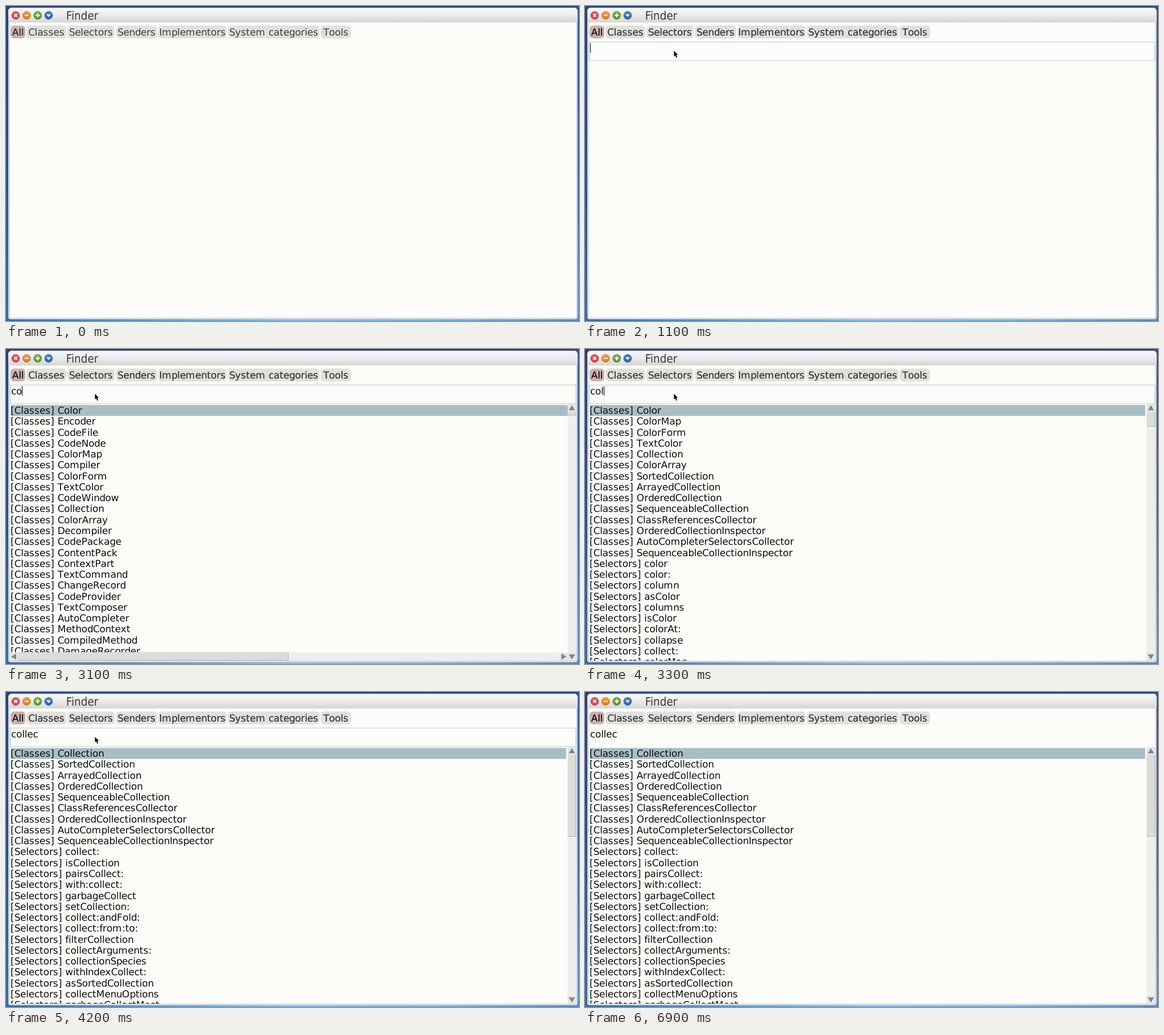
An HTML page with a canvas that plays this animation: 1008x555 px, repeating every 7200 ms.

```html
<!DOCTYPE html>
<html lang="en">
<head>
<meta charset="utf-8">
<title>Finder</title>
<style>
  html, body { margin: 0; width: 100%; height: 100%; overflow: hidden; }
  canvas { display: block; width: 1008px; height: 555px; }
</style>
</head>
<body>
<canvas id="stage" width="1008" height="555"></canvas>
<script>
const ctx = document.getElementById('stage').getContext('2d');
ctx.textRendering = 'geometricPrecision';
const LOOP = 7200;
// Text is laid out in whole pixels of a smaller screen, enlarged evenly.
const SCALE = 1.1335;
const FONT = '14.9px "DejaVu Sans", sans-serif';
const ROW = 17 * SCALE;

const TABS = [
  ['All', 8, 26], ['Classes', 36, 70], ['Selectors', 108, 83], ['Senders', 193.5, 72.5],
  ['Implementors', 268, 120], ['System categories', 390.5, 161], ['Tools', 553.5, 53.5]
];

const collClasses = 'Collection SortedCollection ArrayedCollection OrderedCollection ' +
  'SequenceableCollection ClassReferencesCollector OrderedCollectionInspector ' +
  'AutoCompleterSelectorsCollector SequenceableCollectionInspector';

const RESULTS = {
  co: {
    classes: 'Color Encoder CodeFile CodeNode ColorMap Compiler ColorForm TextColor CodeWindow ' +
      'Collection ColorArray Decompiler CodePackage ContentPack ContextPart TextCommand ' +
      'ChangeRecord CodeProvider TextComposer AutoCompleter MethodContext CompiledMethod DamageRecorder',
    selectors: '', thumb: 6, wide: true
  },
  col: {
    classes: 'Color ColorMap ColorForm TextColor Collection ColorArray ' + collClasses.slice(11),
    selectors: 'color color: column asColor columns isColor colorAt: collapse collect: colorMap',
    thumb: 26
  },
  coll: {
    classes: collClasses,
    selectors: 'collapse collect: collapseAll isCollapsed collapseIcon isCollection pairsCollect: ' +
      'with:collect: garbageCollect setCollection: aboutToCollapse: collect:andFold: ' +
      'collect:from:to: filterCollection haloCollapseIcon',
    thumb: 111
  },
  colle: {
    classes: collClasses,
    selectors: 'collect: isCollection pairsCollect: with:collect: garbageCollect setCollection: ' +
      'collect:andFold: collect:from:to: filterCollection collectArguments: collectionSpecies ' +
      'withIndexCollect: asSortedCollection collectMenuOptions garbageCollectMost',
    thumb: 144
  }
};
RESULTS.collec = RESULTS.colle;

// [time, value] steps; the last one reached applies.
const TYPED = [[0, ''], [3100, 'co'], [3300, 'col'], [3400, 'coll'], [3500, 'colle'], [3700, 'collec']];
const CARET = [[0, false], [1000, true], [2100, false], [2600, true], [4200, false], [4700, true],
  [5200, false], [5800, true], [6300, false]];
const POINTER = [[0, null], [800, [141, 25]], [900, [148, 52]], [1000, [154, 73]], [1100, [156, 79]],
  [6500, [155, 72]], [6600, [153, 54]], [6700, [150, 29]], [6800, [147, 2]], [6900, null]];
const TABS_REDRAWN = 800;

function stepAt(steps, t) {
  let value = steps[0][1];
  for (const [start, v] of steps) if (t >= start) value = v;
  return value;
}

function box(x, y, w, h, fill) {
  ctx.fillStyle = fill;
  ctx.fillRect(x, y, w, h);
}

function roundBox(x, y, w, h, r, fill) {
  ctx.fillStyle = fill;
  ctx.beginPath();
  ctx.roundRect(x, y, w, h, r);
  ctx.fill();
}

function poly(points, fill) {
  ctx.fillStyle = fill;
  ctx.beginPath();
  for (const [x, y] of points) ctx.lineTo(x, y);
  ctx.closePath();
  ctx.fill();
}

function gradient(x0, y0, x1, y1, colors) {
  const g = ctx.createLinearGradient(x0, y0, x1, y1);
  colors.forEach((c, i) => g.addColorStop(i / (colors.length - 1), c));
  return g;
}

function advance(ch) {
  ctx.font = FONT;
  return Math.round(ctx.measureText(ch).width);
}

function textWidth(text) {
  return SCALE * [...text].reduce((sum, ch) => sum + advance(ch), 0);
}

function drawText(text, x, y, color) {
  ctx.save();
  ctx.translate(x, y);
  ctx.scale(SCALE, SCALE);
  ctx.fillStyle = color;
  let pen = 0;
  for (const ch of text) {
    const step = advance(ch);
    ctx.fillText(ch, pen, 0);
    pen += step;
  }
  ctx.restore();
  return x + pen * SCALE;
}

function drawDesktop() {
  box(0, 0, 1008, 555, '#2b4a8c');
  box(0, 0, 8, 555, gradient(0, 0, 0, 555, ['#27417f', '#2a4f98', '#3a6cb2']));
  box(1000, 0, 8, 555, gradient(0, 0, 0, 555, ['#2f5295', '#3a64a8', '#5f97d2']));
  box(0, 545, 1008, 10, gradient(0, 0, 1008, 0, ['#3968ae', '#5f9ad6', '#86bbea', '#7ab0e2', '#5688c2']));
}

function drawButton(x, light, dark, sign) {
  const y = 16.5;
  ctx.fillStyle = gradient(0, y - 7, 0, y + 7, [light, dark]);
  ctx.beginPath();
  ctx.arc(x, y, 7, 0, 7);
  ctx.fill();
  ctx.strokeStyle = dark;
  ctx.lineWidth = 0.8;
  ctx.stroke();
  ctx.strokeStyle = '#fff';
  ctx.lineWidth = 1.8;
  ctx.beginPath();
  if (sign === 'x') {
    ctx.moveTo(x - 2.5, y - 2.5); ctx.lineTo(x + 2.5, y + 2.5);
    ctx.moveTo(x + 2.5, y - 2.5); ctx.lineTo(x - 2.5, y + 2.5);
  }
  if (sign === '-' || sign === '+') { ctx.moveTo(x - 3.7, y); ctx.lineTo(x + 3.7, y); }
  if (sign === '+') { ctx.moveTo(x, y - 3.7); ctx.lineTo(x, y + 3.7); }
  ctx.stroke();
  if (sign === 'v') poly([[x - 4, y - 1.8], [x + 4, y - 1.8], [x, y + 2.8]], '#fff');
}

function drawWindow() {
  roundBox(4, 3, 1001.5, 549, [6, 6, 4, 4], '#d3dde4');
  roundBox(4, 3, 1001.5, 26.5, [6, 6, 0, 0], gradient(0, 3, 0, 29, ['#fafafa', '#eaeaea', '#d6d6d6']));
  box(7, 29, 996, 520, '#fcfcf8');
  drawButton(17, '#e0606c', '#cf3f4c', 'x');
  drawButton(36.3, '#e8a04c', '#d87c20', '-');
  drawButton(55.8, '#82b050', '#5a8e2c', '+');
  drawButton(75, '#5586c6', '#2f60a8', 'v');
  ctx.font = 'condensed 20.5px "DejaVu Sans Condensed", "DejaVu Sans", sans-serif';
  ctx.fillStyle = '#3a3a3a';
  ctx.fillText('Finder', 105.8, 24.3);
}

// Repainting the labels over themselves thickens their soft edges.
function drawTabs(passes) {
  TABS.forEach(([label, x, w], i) => {
    roundBox(x, 34.5, w, 22.5, 6, i ? '#e0e0dd' : '#c9b1ae');
    const left = x + (w - textWidth(label)) / 2;
    for (let n = 0; n < passes; n++) drawText(label, left, 51.7, i ? '#3c3c3c' : '#1c1414');
  });
}

function drawArrow(x, y, turn) {
  box(x - 7.5, y - 7, 15, 14, '#e6e6e4');
  ctx.save();
  ctx.translate(x, y);
  ctx.rotate(turn * Math.PI / 2);
  poly([[-5.5, 4], [0, -5], [5.5, 4]], '#868686');
  ctx.restore();
}

function drawThumb(x, y, w, h) {
  box(x, y, w, h, '#b4b4b2');
  box(x, y, w - 1, h - 1, '#dcdcda');
}

function drawList({ classes, selectors, thumb, wide }) {
  const bottom = wide ? 534.5 : 549;
  box(9, 98.6, wide ? 979 : 976.5, ROW, '#a9bdc4');
  ctx.save();
  ctx.beginPath();
  ctx.rect(7, 97, 981, bottom - 97);
  ctx.clip();
  const label = (names, kind) => names.split(' ').filter(Boolean).map(n => `[${kind}] ${n}`);
  const rows = [...label(classes, 'Classes'), ...label(selectors, 'Selectors')];
  rows.forEach((row, i) => drawText(row, 8, 114 + i * ROW, '#0c0c0c'));
  ctx.restore();

  box(988, 96.5, 15, 452.5, '#eeeeec');
  drawArrow(995.5, 104, 0);
  drawArrow(995.5, 542, 2);
  drawThumb(988, 111, 15, thumb);
  if (wide) {
    box(7, 534.5, 981, 14.5, '#eeeeec');
    drawArrow(14, 542, 3);
    drawArrow(981, 542, 1);
    drawThumb(21, 534.5, 476, 14.5);
  }
}

function drawPointer([x, y]) {
  ctx.save();
  ctx.translate(x, y);
  const shape = [[0.5, 0], [0.5, 10], [2.7, 8], [4.4, 12], [6.2, 11.2], [4.5, 7.3], [7.3, 7]];
  ctx.strokeStyle = '#fff';
  ctx.lineWidth = 1.4;
  ctx.beginPath();
  for (const p of shape) ctx.lineTo(...p);
  ctx.closePath();
  ctx.stroke();
  poly(shape, '#000');
  ctx.restore();
}

function render(t) {
  const typed = stepAt(TYPED, t);
  const pointer = stepAt(POINTER, t);
  drawDesktop();
  drawWindow();
  drawTabs(t < TABS_REDRAWN ? 1 : 2);
  if (typed) drawList(RESULTS[typed]);
  if (pointer && pointer[1] > 62) {
    ctx.strokeStyle = '#b4d0de';
    ctx.lineWidth = 1;
    ctx.strokeRect(7.5, 63.5, 995, 32.5);
  }
  const end = drawText(typed, 9, 80, '#0c0c0c');
  if (stepAt(CARET, t)) box(Math.round(end), 65.5, 1, 17, '#000');
  if (pointer) drawPointer(pointer);
}

const start = performance.now();
function tick() {
  render((performance.now() - start) % LOOP);
  requestAnimationFrame(tick);
}
tick();
</script>
</body>
</html>
```
